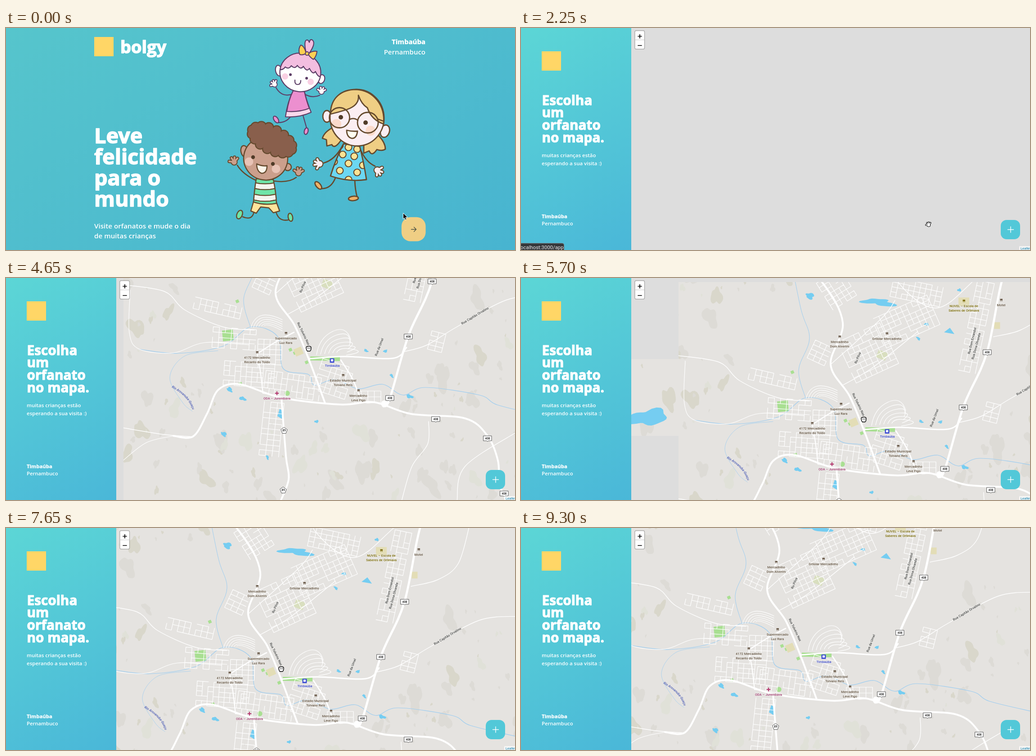
An HTML page with a canvas for the animation above (9.58 s loop, 1131 px wide and 495 px high).

```html
<!DOCTYPE html>
<html lang="pt">
<head>
<meta charset="utf-8">
<title>Leve felicidade para o mundo</title>
<style>
html, body { margin: 0; width: 100%; height: 100%; overflow: hidden; background: #ddd; }
canvas { display: block; }
</style>
</head>
<body>
<canvas id="stage" width="1131" height="495"></canvas>
<script>
const W = 1131, H = 495, LOOP = 9580, STEP = 150, SIDE = 245;
const TAU = Math.PI * 2;
const SANS = '"Open Sans", sans-serif', MAPFONT = 'Roboto, sans-serif';
const stage = document.getElementById('stage').getContext('2d');
let c = stage;

// ---------- helpers ----------
function layer(w, h, draw) {
  const cv = document.createElement('canvas');
  cv.width = w; cv.height = h;
  c = cv.getContext('2d');
  c.lineCap = c.lineJoin = 'round';
  draw();
  c = stage;
  return cv;
}
const points = s => s.split(' ').map(p => p.split(',').map(Number));
const clamp = v => Math.max(0, Math.min(1, v));

function randomizer(seed) {
  return () => (seed = (seed * 16807) % 2147483647) / 2147483647;
}
function text(s, x, y, font, color = '#fff', align = 'left', weight = 0) {
  c.font = font; c.textAlign = align; c.fillStyle = color;
  if (weight) {
    c.strokeStyle = color; c.lineWidth = weight;
    c.strokeText(s, x, y);
  }
  c.fillText(s, x, y);
}
function paint(path, fill, ink, width) {
  if (fill) { c.fillStyle = fill; c.fill(path); }
  if (ink) { c.strokeStyle = ink; c.lineWidth = width; c.stroke(path); }
}
const shape = (d, fill, ink, width = 2.5) => paint(new Path2D(d), fill, ink, width);

function oval(x, y, rx, ry, rot, fill, ink, width = 2.5) {
  const p = new Path2D();
  p.ellipse(x, y, rx, ry, rot, 0, TAU);
  paint(p, fill, ink, width);
}
const dot = (x, y, r, fill, ink, width) => oval(x, y, r, r, 0, fill, ink, width);

function box(x, y, w, h, r, fill, ink, width = 1) {
  const p = new Path2D();
  p.roundRect(x, y, w, h, r);
  paint(p, fill, ink, width);
}
function clipped(path, draw) {
  c.save();
  c.clip(path);
  draw();
  c.restore();
}
function backdrop(w, from, to) {
  const a = 329.54 * Math.PI / 180, dx = Math.sin(a), dy = -Math.cos(a);
  const half = (Math.abs(w * dx) + Math.abs(H * dy)) / 2;
  const g = c.createLinearGradient(w / 2 - dx * half, H / 2 - dy * half, w / 2 + dx * half, H / 2 + dy * half);
  g.addColorStop(0, from); g.addColorStop(1, to);
  c.fillStyle = g;
  c.fillRect(0, 0, w, H);
}
function hand(x, y, angle, size, fill, ink, edge = 2) {
  for (const [color, grow] of [[ink, edge], [fill, 0]]) {
    c.strokeStyle = color;
    c.lineWidth = size * .34 + grow * 2;
    for (const k of [-1.5, -.65, 0, .65]) {
      c.beginPath();
      c.moveTo(x, y);
      c.lineTo(x + Math.cos(angle + k) * size, y + Math.sin(angle + k) * size);
      c.stroke();
    }
    dot(x, y, size * .52 + grow, color);
  }
}

// ---------- landing page ----------
function pinkGirl() {
  const ink = '#5c3d66', pink = '#f3bee0', rose = '#ec8fcf', bow = '#fdd053', w = 2.2;
  shape('M638 147Q613 156 600 133M661 146Q680 158 697 150M632 198Q622 211 605 211M660 195L668 223', null, ink, w);
  hand(597, 126, -1.9, 9, '#fff', ink, 1.8);
  hand(701, 142, -1.1, 9.5, '#fff', ink, 1.8);
  oval(600, 204, 4.5, 8.5, -.6, rose, ink, w);
  oval(667, 230, 4.2, 7.5, .25, rose, ink, w);
  shape('M638 140L663 142Q669 166 678 188Q652 200 621 198Q625 166 638 140Z', '#f8d9ec', ink, w);
  shape('M638 140L663 142Q668 164 674 179Q652 188 624 186Q628 160 638 140Z', rose, ink, w);
  oval(606, 95, 7, 12, -.2, '#fff', ink, w);
  oval(701, 114, 7, 10, .3, '#fff', ink, w);
  const head = new Path2D();
  head.ellipse(654, 99, 45.5, 43, .1, 0, TAU);
  paint(head, '#fff');
  clipped(head, () => {
    const fringe = new Path2D('M600 40V92'), n = 7, span = 94 / n;
    for (let i = 1; i <= n; i++) {
      const x = 607 + i * span, y = 91 + i * 2 - 14 * Math.sin(Math.PI * i / n);
      fringe.quadraticCurveTo(x - span * .4, y + 9, x, y);
    }
    fringe.lineTo(710, 40);
    paint(fringe, pink, ink, w);
  });
  paint(head, null, ink, w);
  shape('M667 56Q662 34 666 28Q671 24 674 32Q676 23 681 27Q689 34 674 56Z', pink, ink, w);
  shape('M667 57Q655 62 652 58Q649 45 655 38Q663 40 667 57ZM671 58Q680 50 691 52Q690 63 683 70Q676 66 671 58Z', bow, ink, w);
  dot(669, 57, 4, bow, ink, w);
  dot(620, 108, 7, '#f9d0e3'); dot(677, 120, 7, '#f9d0e3');
  dot(632, 104, 3, ink); dot(668, 112, 3, ink);
  shape('M642 116Q641 126 648 126Q655 126 655 117', null, ink, w);
}
function curlyBoy() {
  const ink = '#654a2e', skin = '#cb9f8c', hair = '#895f4c', green = '#6fe5a8';
  shape('M556 340Q526 326 514 306M594 341Q628 346 645 333M551 410Q547 430 526 421M600 410Q606 432 627 428', null, ink);
  hand(507, 299, -1.5, 11, skin, ink);
  hand(650, 323, -1.1, 11, skin, ink);
  oval(519, 416, 6, 10, .4, green, ink);
  oval(632, 422, 5, 9, -.2, green, ink);
  shape('M550 387L601 389L608 408L594 412L584 401L566 399L556 413L544 408Z', '#ffe49b', ink);
  const shirt = new Path2D('M556 336L594 338Q600 366 601 391Q574 396 550 388Q552 360 556 336Z');
  clipped(shirt, () => {
    for (let i = 0; i < 5; i++) {
      const y = 330 + i * 13;
      shape(`M545 ${y}Q575 ${y + 9} 606 ${y}V${y + 13}Q575 ${y + 22} 545 ${y + 13}Z`, i % 2 ? '#f4f5ee' : green, ink, 2.2);
    }
  });
  paint(shirt, null, ink, 2.5);
  oval(530, 275, 8, 13, -.2, skin, ink);
  dot(626, 310, 8, skin, ink);
  oval(577, 291, 49, 48, .2, skin, ink);
  for (const [grow, color] of [[2.3, ink], [0, hair]]) {
    for (let a = 0; a < TAU; a += TAU / 16) {
      const u = 49 * Math.cos(a), v = 23 * Math.sin(a);
      dot(591 + u * .89 - v * .45, 249 + u * .45 + v * .89, 9.5 + grow, color);
    }
    oval(591, 249, 49, 24, .47, color);
  }
  dot(540, 298, 9.5, '#e8c3b6'); dot(600, 314, 9.5, '#e8c3b6');
  dot(549, 288, 4.2, '#503b28'); dot(593, 303, 4.2, '#503b28');
  shape('M557 303Q570 309 580 307Q580 324 568 324Q557 320 557 303Z', '#fbf3e8', ink);
}
function blondGirl() {
  const ink = '#654a2e', skin = '#fbeef2', hair = '#efce84', w = 2.8;
  shape('M748 262Q731 294 706 301M788 272Q800 299 820 308M732 334Q722 359 701 358M775 340Q776 362 780 376', null, ink, w);
  hand(697, 303, 3.6, 12, skin, ink, 2.2);
  hand(825, 317, 1, 12, skin, ink, 2.2);
  oval(694, 351, 5, 10, -.7, '#f0b267', ink, w);
  oval(772, 380, 11, 5, -.1, '#f0b267', ink, w);
  shape('M726 222Q707 232 703 246L712 249L713 263L724 260Q730 272 746 248Z', hair, ink, w);
  shape('M795 260L795 279L807 274Q813 288 824 271Q836 275 843 270Q843 256 828 240Z', hair, ink, w);
  const dress = new Path2D('M750 258L786 264Q795 300 801 338Q762 344 721 330Q732 294 750 258Z');
  paint(dress, '#6bd7f2');
  clipped(dress, () => {
    for (let i = -2; i < 3; i++) for (let j = -2; j < 3; j++) {
      if ((i + j) % 2 === 0) dot(761 + i * 16 * (1 + j * .2), 302 + j * 18 + i * 2, 7.5, '#fbe394', ink, 2.2);
    }
  });
  paint(dress, null, ink, w);
  oval(713, 197, 9, 13, 0, skin, ink, w);
  oval(842, 230, 10, 14, .3, skin, ink, w);
  oval(780, 200, 60, 63, -.1, skin, ink, w);
  dot(734, 214, 11, '#fbdacb'); dot(810, 229, 11, '#fbdacb');
  shape('M721 192C721 156 745 137 778 137C816 139 843 172 839 214Q812 205 803 178Q790 170 783 150Q786 172 757 182Q738 188 721 192Z', hair, ink, w);
  dot(741, 200, 22.5, null, ink, w);
  dot(804, 211, 23, null, ink, w);
  shape('M763 204Q773 199 782 206M826 203L837 207', null, ink, w);
  dot(744, 199, 5, '#503b28'); dot(799, 211, 5, '#503b28');
  shape('M757 228Q769 231 781 230Q779 247 768 246Q757 243 757 228Z', '#fffdf0', ink, w);
}
const landing = layer(W, H, () => {
  backdrop(W, '#48b4d0', '#56c5cc');
  c.fillStyle = '#ffd666';
  c.fillRect(196, 20, 43, 43);
  text('bolgy', 254, 56, `700 38px ${SANS}`, '#fff', 'left', 1.6);
  text('Timbaúba', 932, 36, `700 15px ${SANS}`, '#fff', 'right', .4);
  text('Pernambuco', 932, 59, `600 15px ${SANS}`, '#fff', 'right');
  ['Leve', 'felicidade', 'para o', 'mundo'].forEach((s, i) =>
    text(s, 196, 256.5 + i * 47, `700 46.8px ${SANS}`, '#fff', 'left', 1.6));
  ['Visite orfanatos e mude o dia', 'de muitas crianças'].forEach((s, i) =>
    text(s, 196, 446.5 + i * 22.8, `600 15.2px ${SANS}`));
  pinkGirl();
  curlyBoy();
  blondGirl();
});

// ---------- map ----------
const WORLD = { x: 100, y: -150, w: 1050, h: 760 };
const TILE = 171.5, EDGE = { x: 208.5, y: -46 };

// Smooth line through all points.
function road(s, width = 1.4, color = '#fff') {
  const p = points(s);
  const at = i => p[Math.max(0, Math.min(p.length - 1, i))];
  c.beginPath();
  c.moveTo(...p[0]);
  for (let i = 0; i < p.length - 1; i++) {
    const [a, b, d, e] = [at(i - 1), at(i), at(i + 1), at(i + 2)];
    c.bezierCurveTo(b[0] + (d[0] - a[0]) / 6, b[1] + (d[1] - a[1]) / 6,
      d[0] - (e[0] - b[0]) / 6, d[1] - (e[1] - b[1]) / 6, ...d);
  }
  c.strokeStyle = color; c.lineWidth = width;
  c.stroke();
}
// Grid of street blocks with some streets left out.
function district(x, y, w, h, degrees, rnd) {
  const n = Math.max(2, Math.round(w / 13)), m = Math.max(2, Math.round(h / 12));
  c.save();
  c.translate(x, y);
  c.rotate(degrees * Math.PI / 180);
  c.translate(-w / 2, -h / 2);
  c.beginPath();
  for (let i = 0; i <= n; i++) for (let j = 0; j <= m; j++) {
    const u = i * w / n, v = j * h / m;
    if (i < n && rnd() < .85) { c.moveTo(u, v); c.lineTo(u + w / n, v); }
    if (j < m && rnd() < .85) { c.moveTo(u, v); c.lineTo(u, v + h / m); }
  }
  c.strokeStyle = '#fff'; c.lineWidth = 1.2;
  c.stroke();
  c.restore();
}
function blob(x, y, rx, ry, turn, fill, rough = .18) {
  c.save();
  c.translate(x, y);
  c.rotate(turn);
  c.beginPath();
  for (let a = 0; a < TAU; a += .2) {
    const q = 1 + rough * (Math.sin(2 * a + x) + Math.sin(3 * a + y) + .6 * Math.sin(5 * a + x + y));
    c.lineTo(Math.cos(a) * rx * q, Math.sin(a) * ry * q);
  }
  c.fillStyle = fill;
  c.fill();
  c.restore();
}
// Hills fill the country around the town.
function hills(rnd) {
  for (let i = 0; i < 330; i++) {
    const x = WORLD.x + rnd() * WORLD.w, y = WORLD.y + rnd() * WORLD.h, r = 3 + 24 * rnd() ** 2;
    const turn = .9 + rnd() * 1.2, tone = rnd();
    const town = ((x - 640) / 310) ** 2 + ((y - 170) / 260) ** 2 < 1;
    if (town || (x > 560 && y < 120)) continue;
    blob(x, y, r, r * .55, turn, tone < .25 ? '#d9d7cb' : tone < .85 ? '#dddbd6' : '#e0e1d8');
  }
}
function patch(x, y, w, h, turn, fill) {
  c.save();
  c.translate(x, y);
  c.rotate(turn);
  c.fillStyle = fill;
  c.fillRect(-w / 2, -h / 2, w, h);
  c.restore();
}
function label(lines, x, y, color = '#61503f', turn = 0) {
  c.save();
  c.translate(x, y);
  c.rotate(turn);
  c.font = `500 7.4px ${MAPFONT}`;
  c.textAlign = 'center';
  c.strokeStyle = 'rgba(240,239,236,.9)'; c.lineWidth = 1.6;
  c.fillStyle = color;
  lines.split('|').forEach((s, i) => {
    c.strokeText(s, 0, 2.7 + i * 9.8);
    c.fillText(s, 0, 2.7 + i * 9.8);
  });
  c.restore();
}
function place(lines, x, y, color = '#61503f') {
  c.fillStyle = color;
  c.fillRect(x - 2.5, y - 2.5, 5.5, 3);
  c.fillRect(x - 2, y + 1.2, 1.5, 1.5);
  c.fillRect(x + 1, y + 1.2, 1.5, 1.5);
  label(lines, x, y + 11, color);
}
function riverName(s, x, y) {
  c.font = `italic 500 7.4px ${MAPFONT}`;
  c.textAlign = 'left'; c.fillStyle = '#4a5bb5';
  [...s].forEach((ch, i) => {
    const a = .52 + .8 * (i / s.length) ** 1.6, w = c.measureText(ch).width;
    c.save(); c.translate(x, y); c.rotate(a); c.fillText(ch, 0, 0); c.restore();
    x += Math.cos(a) * w; y += Math.sin(a) * w;
  });
}
function shield(d, number, x, y) {
  c.save();
  c.translate(x, y);
  shape(d, '#fff', '#555', 1);
  text(number, 0, 2.4, `700 6.4px ${MAPFONT}`, '#333', 'center');
  c.restore();
}
function land(rnd) {
  const water = '#75cdf1', green = '#a9df92', sand = '#e3ddb6';
  c.fillStyle = '#e5e3e0';
  c.fillRect(WORLD.x, WORLD.y, WORLD.w, WORLD.h);
  hills(rnd);
  patch(441, 231, 24, 24, -.1, green);
  patch(657, 283, 66, 9, .02, green);
  for (const [x, y] of points('580,263 590,270 616,291 469,339 462,155')) patch(x, y, 7, 7, -.4, green);
  dot(573, 360, 5.7, green);
  patch(598, 267, 18, 17, -.4, sand);
  patch(661, 117, 22, 18, .4, '#d9dfbf');
  patch(843, -2, 24, 19, 0, sand);
  patch(917, 51, 13, 15, 0, sand);

  blob(140, 256, 40, 19, -.1, water);
  blob(501, -15, 10, 6, .2, water);
  blob(654, -1, 31, 8, .05, water, .25);
  shape('M799 66L812 56L822 70ZM556 395L561 398V417L551 411Z', water);
  for (const [x, y] of points('742,80 760,48 833,-28 805,321 748,265 791,266 638,423 529,503')) blob(x, y, 4.5, 3, x, water);
  for (const [x, y] of points('445,352 474,372 432,451 845,367')) blob(x, y, 7.5, 4, .5, water);

  const stream = '#9dcdf0';
  road('450,-142 480,10 500,80 476,150 492,215', 1, stream);
  road('245,262 330,271 430,255 492,212 552,234 564,305 620,318 633,342 680,329 730,350 785,340 830,364 880,347 1000,364 1040,386 1140,410', 1.2, stream);
  road('419,265 345,277 312,325 340,380 362,400', .8, stream);
}
function streets(rnd) {
  const grid = (...d) => district(...d, rnd);
  grid(488, 318, 112, 54, 4);
  grid(584, 343, 124, 52, 8);
  grid(676, 328, 74, 72, 18);
  grid(418, 170, 106, 26, 13);
  grid(560, -30, 62, 70, -32);
  grid(738, -24, 112, 44, 12);
  grid(716, 42, 130, 72, -24);
  grid(630, 112, 104, 100, -25);
  grid(871, 54, 38, 205, 12);
  grid(455, 238, 96, 46, 4);
  grid(534, 268, 54, 56, 2);
  grid(523, 112, 42, 44, 25);
  grid(752, 368, 58, 26, 0);
  grid(905, 245, 32, 42, 14);
  grid(538, 440, 44, 120, 6);
  for (let i = 0; i < 6; i++) {
    const x = 638 + i * 9, y = 274 - i;
    shape(`M${x} ${y}Q${x + 6} ${y - 38 + i * 5} ${x + 36} ${y - 52 + i * 9}T${x + 76 - i * 11} ${y - 34 + i * 8}`, null, '#fff', 1.2);
    shape(`M${492 + i * 6} ${214 - i}Q${505 + i * 5} ${168 + i * 7} 562 ${196 + i * 5}`, null, '#fff', 1.1);
  }

  road('208,118 300,133 345,174 430,212 500,219');
  road('224,130 222,225 245,262 320,270 390,247 500,250', 1.2);
  road('208,437 300,452 364,457', 1.5);
  road('208,510 260,470 320,455', 1.2);
  road('829,268 882,253 948,213 1060,152 1145,143');
  road('1039,-60 1014,25 969,61 909,76');
  road('692,-150 686,-62 780,12 880,-62 986,-145');
  road('547,138 660,35 690,-5');
  road('572,185 640,145 740,65');
  road('887,423 885,473 850,523 827,600');
  road('1085,445 968,523 950,600');

  road('432,-142 527,-47 574,45 547,138 589,208 622,287 657,382', 4);
  road('990,-150 934,-70 894,112 842,232 801,371 787,389', 4.8);
  road('320,455 364,456 395,405 420,352 468,340 560,370 690,385 766,380 848,406 968,416 1018,455 1041,510 1045,565 1066,610', 4);
  road('622,283 700,278 808,282 838,258', 3);
  road('692,286 717,326 740,376 766,380', 2.8);
  road('506,272 545,247 588,224', 2.6);
  road('506,272 513,310 519,360', 2.2);
  road('560,370 570,500 576,552 556,605', 4);
  box(782, 376, 14, 15, 6, '#fff');
}
function names() {
  for (const [x, y] of points('947,-108 895,111 842,234 801,371 903,418 1018,461 1055,584')) {
    shield('M-9 -6h18v11h-7l-2 1.5l-2 -1.5h-7Z', '408', x, y);
  }
  for (const [x, y] of points('566,443 564,576')) shield('M0 -7l7 5l-3 8.5h-8l-3 -8.5Z', '89', x, y);

  place('Supermercado|Luz Rara', 570, 226);
  place('4172 Mercadinho|Recanto do Toldo', 506, 269);
  place('Estádio Municipal|Tolvano Reis', 697, 320);
  place('Mercadinho|Leve Figo', 731, 354);
  place('Mercadinho|Dom Alverim', 567, 76);
  place('Grilolar Mercadinho', 672, 69);
  place('NUVEL – Escola de|Saberes de Orlimava', 843, -4, '#756400');
  place('Motel', 926, -6);
  label('ODA – Jurembava', 550, 371, '#a03a70');
  shape('M546.5 360h7M550 356.5v7', null, '#b4326c', 2);
  box(667.5, 282, 10, 10, 1, '#4453d3');
  box(670, 284, 5, 5, 1, '#fff');
  label('Timbaúba', 673, 298, '#3b48c9');
  const dark = '#444';
  label('Rua Tolvério Nas', 609, 227, dark, 1.12);
  label('Ru Pilva', 607, 123, dark, -1.18);
  label('Rua Capitão Orvalino', 990, 187, dark, -.54);
  label('Rua da Umel', 777, 257, dark, -1.2);
  label('Rua Dom Ervandol', 861, 85, dark, -1.33);
  label('Rua Dona Olvanda', 870, 97, dark, -1.31);
  riverName('Rio Arovanuba-Guaçu', 316, 347);
}
const world = layer(WORLD.w, WORLD.h, () => {
  const rnd = randomizer(4711);
  c.translate(-WORLD.x, -WORLD.y);
  land(rnd);
  streets(rnd);
  names();
});
const panel = layer(W, H, () => {
  backdrop(SIDE, '#4ab7d8', '#5cd6d6');
  c.fillStyle = '#ffd666';
  c.fillRect(46, 52, 43, 43);
  ['Escolha', 'um', 'orfanato', 'no mapa.'].forEach((s, i) =>
    text(s, 46.5, 171.5 + i * 27.7, `700 29.8px ${SANS}`, '#fff', 'left', 1.2));
  ['muitas crianças estão', 'esperando a sua visita :)'].forEach((s, i) =>
    text(s, 46, 287.5 + i * 18.5, `600 11.5px ${SANS}`));
  text('Timbaúba', 46, 424, `700 11.4px ${SANS}`, '#fff', 'left', .3);
  text('Pernambuco', 46, 440, `600 11.3px ${SANS}`);
  box(253, 6, 21.5, 41, 3, '#fff', 'rgba(0,0,0,.28)', 1.4);
  c.fillStyle = '#ccc'; c.fillRect(253.5, 26, 20.5, 1);
  shape('M260 18.5h8M264 14.5v8M260 39h8', null, '#000', 1.7);
  box(1066, 428, 43, 43, 13, '#52c8d8');
  shape('M1081.5 449.5h13M1088 443v13', null, '#fff', 1.4);
  c.fillStyle = 'rgba(255,255,255,.7)'; c.fillRect(1107, 486.5, 24, 9);
  text('Leaflet', 1110, 494, '7.4px "Liberation Sans", sans-serif', '#0078a8');
});

// ---------- motion ----------
// Each key is [time, x, y].
const DRAG = [[4050, -5, 8], [4650, 52, -103], [5700, 141, 55], [6600, 73, 142], [7650, -9, 54], [8550, 0, 0]];
const ENTER = [[2550, 906, 438], [3600, 615, 268]];
const LEAVE = [[8550, 620, 260], [8850, 826, 403], [9150, 1053, 482], [9300, 1160, 520]];
const GRAB = [620, 260];

// Smooth path through timed positions.
function track(keys, t) {
  const last = keys.length - 1;
  if (t <= keys[0][0]) return keys[0].slice(1);
  if (t >= keys[last][0]) return keys[last].slice(1);
  const i = keys.findIndex(k => k[0] > t) - 1;
  const a = keys[i], b = keys[i + 1], d = b[0] - a[0], u = (t - a[0]) / d;
  const slope = (k, n) => k <= 0 || k >= last ? 0 : (keys[k + 1][n] - keys[k - 1][n]) / (keys[k + 1][0] - keys[k - 1][0]);
  return [1, 2].map(n =>
    a[n] * (1 + 2 * u) * (1 - u) ** 2 + b[n] * u * u * (3 - 2 * u) +
    d * u * (1 - u) * ((1 - u) * slope(i, n) - u * slope(i + 1, n)));
}
function arrowCursor(x, y) {
  shape(`M${x} ${y}v13l3 -2.8l2.2 4.8l2.4 -1.2l-2.2 -4.5h4.2Z`, '#000', '#fff', 1);
}
function fist(x, y) {
  shape(`M${x - 5} ${y - 1}q0 -4 3 -3q1 -2 3 -.5q2 -1.5 3 .5q2 -.5 2 3q0 5 -2.5 7h-6q-2.5 -3 -2.5 -7Z`, '#fff', '#000', 1.4);
  for (const k of [-1.5, 1, 3.5]) shape(`M${x + k} ${y - 2}v3`, null, '#000', .7);
}
function pointing(x, y) {
  shape(`M${x - 1} ${y + 1}q0 -2 1.5 -2t1.5 2v4.5l6 1.5q1.5 1 1 4l-1.5 4h-7l-4.5 -6q0 -2 3 0Z`, '#fff', '#000', 1.1);
}
function statusBar() {
  box(-5, 480, 100.5, 20, 4, '#35373a', '#77797b');
  text('localhost:3000/app', -4, 492.5, '11.4px Roboto, sans-serif', '#e8eaed');
}
function drawLanding(t) {
  const hover = t >= 450;
  c.drawImage(landing, 0, 0);
  box(878.8, 421.8, 53.7, 53.7, 20, hover ? '#96feff' : '#efce84');
  shape('M900.5 449h10.5M906.5 444l5 5l-5 5', null, '#4d5345', 1.4);
  if (hover) pointing(903, 446);
  else arrowCursor(882.5 - 16 * Math.sin(Math.PI * t / 300), 413 - 27 * Math.sin(Math.PI * t / 300));
}
function loadTime(col, row) {
  if (row < 0) return col % 3 ? 6375 : 6525;
  if (col < 0) return row === 1 ? 5400 : 5700;
  return 3600;
}
function drawMap(t) {
  const [ox, oy] = track(DRAG, t).map(Math.round);
  c.fillStyle = '#ddd';
  c.fillRect(0, 0, W, H);
  c.drawImage(world, WORLD.x + ox, WORLD.y + oy);
  const left = col => Math.round(EDGE.x + col * TILE + ox), top = row => Math.round(EDGE.y + row * TILE + oy);
  for (let col = -1; col < 6; col++) for (let row = -1; row < 5; row++) {
    c.fillStyle = `rgba(221,221,221,${1 - clamp((t - loadTime(col, row)) / 300)})`;
    c.fillRect(left(col), top(row), left(col + 1) - left(col), top(row + 1) - top(row));
  }
  c.drawImage(panel, 0, 0);
  if (t < 3000) statusBar();
  if (t >= 4050 && t <= 8550) fist(GRAB[0] + ox, GRAB[1] + oy);
  else {
    const [x, y] = track(t < 4050 ? ENTER : LEAVE, t);
    hand(x, y + 1.5, -1.57, 6, '#fff', '#000', 1);
  }
}
function frame() {
  const now = performance.now() % LOOP;
  const t = Math.min(9300, Math.floor(now / STEP) * STEP);
  c.lineCap = c.lineJoin = 'round';
  if (t < 1800) {
    drawLanding(t);
    if (t >= 1650) statusBar();
  } else drawMap(t);
  requestAnimationFrame(frame);
}
frame();
</script>
</body>
</html>
```
